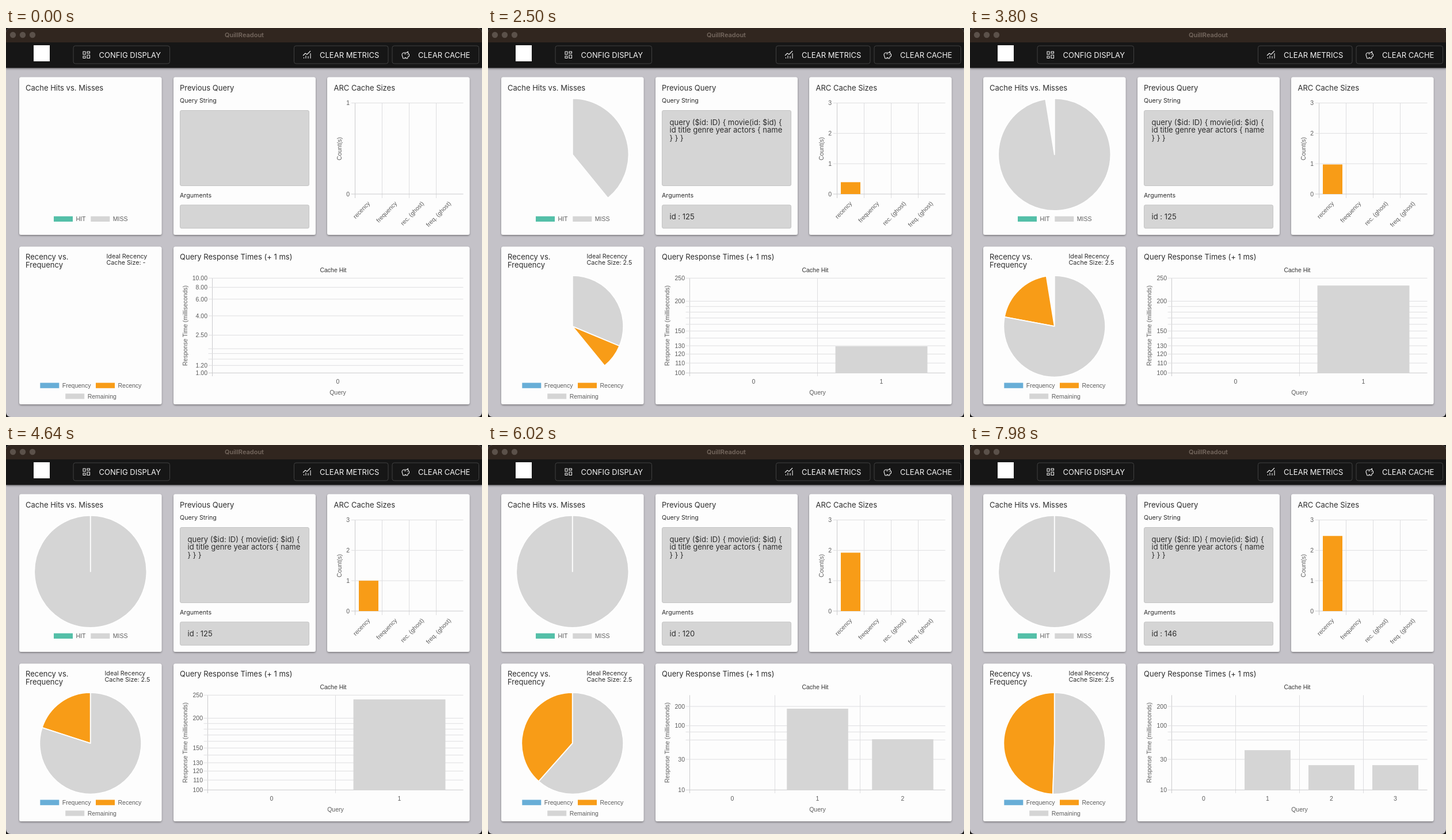
An HTML page that plays this animation: 827x677 px, repeating every 8 s.

```html
<!DOCTYPE html>
<html lang="en">
<head>
<meta charset="utf-8">
<title>Cache dashboard</title>
<style>
  html, body { margin: 0; width: 100%; height: 100%; overflow: hidden; background: #1b1a1a; }
  svg { display: block; width: 827px; height: 677px; }
  text { font: 13px Inter, sans-serif; fill: #2c2c2c; white-space: pre; }
  .small { font-size: 10.7px; }
  .chart { font: 10.5px "Liberation Sans", Arial, sans-serif; fill: #5c5c5c; }
  .button { fill: #f4f4f4; }
  .title { font-size: 11px; font-weight: 600; fill: #75685f; }
  .grid { stroke: #dedee0; fill: none; }
  .axis { stroke: #cbcbcd; fill: none; }
  .icon { stroke: #f0f0f0; stroke-width: 1.1; fill: none; stroke-linejoin: round; }
</style>
</head>
<body>
<svg viewBox="0 0 827 677">
  <defs>
    <filter id="shadow" x="-10%" y="-10%" width="120%" height="125%">
      <feDropShadow dx="0" dy="1.5" stdDeviation="1.5" flood-opacity=".4"/>
    </filter>
    <clipPath id="window"><rect width="827" height="677" rx="8"/></clipPath>
  </defs>
  <g clip-path="url(#window)">
    <g id="static"></g>
    <g id="live"></g>
  </g>
</svg>
<script>
const LOOP = 8000, ANIMATION_FRAMES = 60;
const TEAL = '#54bfa8', GREY = '#d5d5d5', ORANGE = '#f89c17', BLUE = '#68aed7';

// Each query: frame at which it lands, frame at which the response chart restarts.
const queries = [
  { start: 46, barStart: 48, id: 125 },
  { start: 100.6, barStart: 101.2, id: 120 },
  { start: 162.1, barStart: 162.7, id: 146 }
];
const responseTimes = [240, 72.6, 72.6];
const responseAxes = {
  empty: { min: 1, max: 10, left: 358.5, lines: [1, 1.2, 1.4, 1.6, 1.8, 2.5, 4, 6, 8, 10],
    labels: ['1.00', '1.20', '2.50', '4.00', '6.00', '8.00', '10.00'] },
  first: { min: 100, max: 250, left: 350.5, lines: [100, 110, 120, 130, 140, 150, 160, 170, 180, 190, 200, 250],
    labels: ['100', '110', '120', '130', '150', '200', '250'] },
  later: { min: 10, max: 300, left: 350.5, lines: [10, 30, 60, 80, 100, 200],
    labels: ['10', '30', '100', '200'] }
};

const rect = (x, y, w, h, fill, extra = '') =>
  `<rect x="${x}" y="${y}" width="${w}" height="${h}" fill="${fill}" ${extra}/>`;
const text = (x, y, value, cls = '', anchor = 'start', extra = '') =>
  `<text x="${x}" y="${y}" class="${cls}" text-anchor="${anchor}" ${extra}>${value}</text>`;
const path = (d, cls) => `<path d="${d}" class="${cls}"/>`;
const rotated = (x, y, angle, value, anchor) =>
  text(x, y, value, 'chart', anchor, `transform="rotate(${angle} ${x} ${y})"`);
const legend = (x, y, color, label) =>
  rect(x, y, 33, 9.3, color) + text(x + 38.5, y + 8.3, label, 'chart');
const easeOutQuart = t => 1 - (1 - Math.min(1, Math.max(0, t))) ** 4;

// Pie slice between two fractions of a turn, clockwise from the top.
function slice(cx, cy, r, from, to, color) {
  if (to - from < 1e-4) return '';
  const point = f => {
    const a = Math.min(f, .99999) * 2 * Math.PI;
    return `${cx + r * Math.sin(a)} ${cy - r * Math.cos(a)}`;
  };
  return `<path d="M${cx} ${cy}L${point(from)}A${r} ${r} 0 ${+(to - from > .5)} 1 ${point(to)}Z"
    fill="${color}" stroke="#fff" stroke-width="1.8" stroke-linejoin="round"/>`;
}

function staticParts() {
  const card = (x, y, w) => rect(x, y, w, 274.5, '#fdfdfd', 'rx="3.5" filter="url(#shadow)"');
  const button = (x, w, textX, label) =>
    rect(x, 31, w, 31, 'none', 'rx="3.5" stroke="#414141"') + text(textX, 52, label, 'button');
  const field = (y, h) => rect(302.5, y, 224, h, GREY, 'rx="2.5" stroke="#c4c4c4"');
  return [
    rect(0, 0, 827, 677, '#c4c2c8'),
    rect(0, 25, 827, 44.5, '#171717', 'filter="url(#shadow)"'),
    rect(0, 0, 827, 25, '#31261f'),
    [12, 29, 46].map(x => `<circle cx="${x}" cy="12" r="5.2" fill="#5b514a"/>`).join(''),
    text(414, 16, 'QuillReadout', 'title', 'middle'),
    rect(48, 30, 28, 28, '#fff'),
    button(117, 167.5, 161.5, 'CONFIG DISPLAY'),
    button(500.5, 163.5, 545, 'CLEAR METRICS'),
    button(671, 150.5, 716, 'CLEAR CACHE'),
    path('M134 41h4v5h-4zM141 41h4.5v3h-4.5zM134 49h4v3.5h-4zM141 47h4.5v5.5h-4.5z', 'icon'),
    path('M516 48l4-4 3 2 6-6M517.5 53v-2M521 53v-5M525 53v-4M529 53v-9', 'icon'),
    path('M690 53l-2-6q0-4 4-4h4l2.500-2v3l2 2v3l-2 1-1 3h-2.500v-1.500h-2v1.500zM692 45h3M697.500 46v1', 'icon'),

    card(23, 85.5, 247.5), card(291, 85.5, 247), card(558, 85.5, 247.5),
    card(23, 380.5, 247.5), card(291, 380.5, 514.5),

    text(34, 108.8, 'Cache Hits vs. Misses'),
    legend(83, 327.7, TEAL, 'HIT'), legend(147.3, 327.7, GREY, 'MISS'),

    text(302, 108.8, 'Previous Query'),
    text(302, 130, 'Query String', 'small'), field(143.5, 131),
    text(302, 295, 'Arguments', 'small'), field(308, 40.5),

    text(569.5, 108.8, 'ARC Cache Sizes'),
    rotated(582.5, 210, -90, 'Count(s)', 'middle'),
    ['recency', 'frequency', 'rec. (ghost)', 'freq. (ghost)']
      .map((label, i) => rotated(633 + i * 46.9, 306, -46, label, 'end')).join(''),

    text(34, 403.3, 'Recency vs.'), text(34, 417, 'Frequency'),
    legend(59.3, 617.5, BLUE, 'Frequency'), legend(156, 617.5, ORANGE, 'Recency'),
    legend(103.2, 636.3, GREY, 'Remaining'),

    text(302, 403.3, 'Query Response Times (+ 1 ms)'),
    text(568.5, 425, 'Cache Hit', 'chart', 'middle', 'style="fill:#333"'),
    rotated(315, 518, -90, 'Response Time (milliseconds)', 'middle')
  ].join('');
}

function cacheSizes(recency, max) {
  const unit = 158.500 / max;
  let out = '';
  for (let i = 0; i < 4; i++) out += path(`M${606.5 + i * 47} 130.500V296`, i ? 'grid' : 'axis');
  for (let v = 0; v <= max; v++) {
    const y = 289 - v * unit;
    out += path(`M600 ${y}H794.500`, v ? 'grid' : 'axis') + text(597, y + 3.7, v, 'chart', 'end');
  }
  return out + rect(613, 289 - recency * unit, 34, recency * unit, ORANGE);
}

function responseChart(count, progress) {
  const { min, max, left, lines, labels } =
    responseAxes[count === 0 ? 'empty' : count === 1 ? 'first' : 'later'];
  const right = 794.5, base = 600.3, column = (right - left) / (count + 1), mid = (left + right) / 2;
  const height = v => 165 * Math.log(v / min) / Math.log(max / min);
  let out = '';
  for (let i = 0; i <= count; i++) {
    const x = left + i * column;
    out += path(`M${x} 435.300V606`, i ? 'grid' : 'axis') +
      text(x + column / 2, 619, i, 'chart', 'middle');
  }
  for (const v of lines)
    out += path(`M${left - 7} ${base - height(v)}H${right}`, v === min ? 'axis' : 'grid');
  for (const label of labels)
    out += text(left - 8.5, base - height(+label) + 3.7, label, 'chart', 'end');
  for (let i = 0; i < count; i++) {
    const h = height(responseTimes[i]) * progress;
    out += rect(left + (i + 1.14) * column, base - h, column * .72, h, GREY);
  }
  return out + text(mid, 638, 'Query', 'chart', 'middle');
}

function liveParts(frame) {
  const count = queries.filter(q => frame >= q.start).length;
  const barCount = queries.filter(q => frame >= q.barStart).length;
  const progressSince = start => easeOutQuart((frame - start) / ANIMATION_FRAMES);
  const barProgress = barCount ? progressSince(queries[barCount - 1].barStart) : 0;
  const progress = count ? progressSince(queries[count - 1].start) : 0;
  const recency = count ? count - 1 + progress : 0;

  let out = cacheSizes(recency, count ? 3 : 1) + responseChart(barCount, barProgress);
  const noteX = count ? 171.5 : 174.5;
  out += text(noteX, 400.5, 'Ideal Recency', 'small') +
    text(noteX, 411.5, `Cache Size: ${count ? 2.5 : '-'}`, 'small');
  if (!count) return out;

  // The first query sweeps both pies open; later ones only move the boundary.
  const sweep = count === 1 ? progress : 1;
  const remaining = count === 1 ? .8 * progress : 1 - recency / 5;
  out += slice(146.8, 220.3, 97.6, 0, sweep, GREY) +
    slice(146.8, 519.2, 88.4, remaining, sweep, ORANGE) +
    slice(146.8, 519.2, 88.4, 0, remaining, GREY);
  ['query ($id: ID) { movie(id: $id) {', 'id title genre year actors { name', '} } }']
    .forEach((line, i) => out += text(315.5, 168.5 + i * 13.8, line));
  return out + text(315.5, 333, `id : ${queries[count - 1].id}`);
}

// Three pictures every 140 ms, held for 20, 100 and 20 ms.
function frameAt(ms) {
  const rest = ms % 140;
  return Math.floor(ms / 140) * 3 + (rest >= 120 ? 2 : rest >= 20 ? 1 : 0);
}

const live = document.getElementById('live');
document.getElementById('static').innerHTML = staticParts();
let shown = -1;
function tick() {
  const frame = frameAt(performance.now() % LOOP);
  if (frame !== shown) live.innerHTML = liveParts(shown = frame);
  requestAnimationFrame(tick);
}
tick();
</script>
</body>
</html>
```
